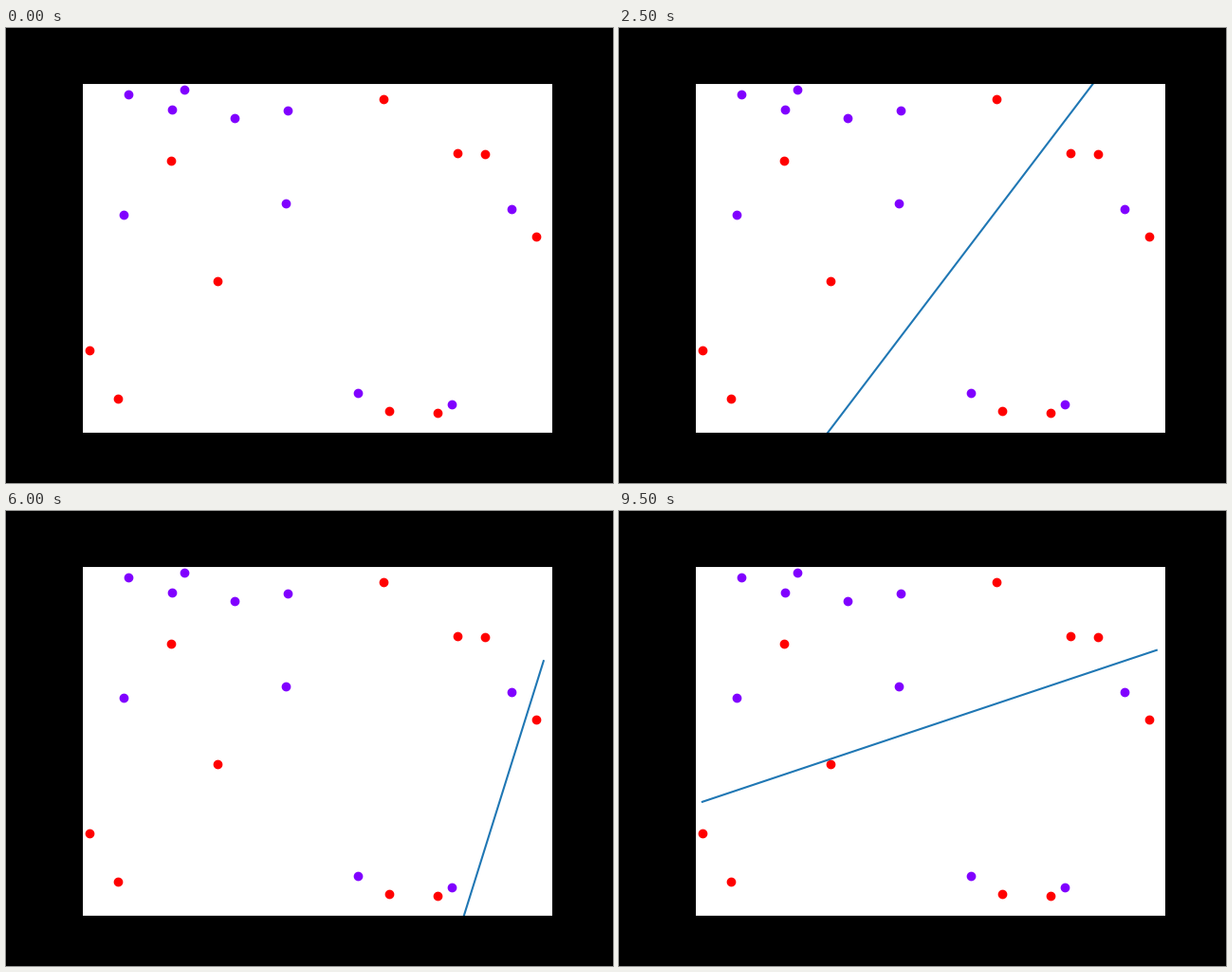
Write a matplotlib script that moves like this. It is 640x480 px and loops after 10000 ms.

```python
import numpy as np
import matplotlib.pyplot as plt
from matplotlib.animation import FuncAnimation

FRAMES, INTERVAL = 20, 500
LEFT, RIGHT = 87.9, 566.8      # horizontal reach of the decision line
TOP, BOTTOM = 59, 427

PURPLE = [(128.7, 69.7), (187.5, 64.9), (174.6, 86), (240.9, 95.3),
          (296.6, 87.2), (294.6, 184.9), (124, 196.5), (532.9, 190.5),
          (371.4, 384.6), (469.8, 396.9)]
RED = [(398.2, 75.4), (475.8, 131.5), (505.2, 132.7), (174, 139.7),
       (559.1, 219.9), (222.9, 266.6), (88.2, 340.4), (117.5, 390.5),
       (403.9, 403.6), (455.2, 406.2)]


def steep(x_top, x_bottom):
    """Line given by where it crosses the top and bottom of the plot."""
    slope = (BOTTOM - TOP) / (x_bottom - x_top)
    return [TOP + slope * (x - x_top) for x in (LEFT, RIGHT)]


def flat(y_left, y_right):
    """Line given by its heights at the left and right ends."""
    return [y_left, y_right]


def through_right(x, y, y_right):
    """Line through (x, y) that ends at the right side at y_right."""
    slope = (y_right - y) / (RIGHT - x)
    return [y_right - slope * (RIGHT - LEFT), y_right]


LINES = [
    None,
    steep(428.6, 350.4),
    steep(563.6, 400),
    flat(345, 105),
    flat(386.6, 60.6),
    steep(499.6, 220),
    steep(135.4, 464.6),
    steep(230.6, 380),
    through_right(290, TOP, 388.5),
    flat(330, 140),
    flat(372.8, 74.9),
    flat(310, 116.5),
    through_right(482.8, BOTTOM, 158.2),
    steep(511.6, 356.4),
    steep(400, 494.6),
    steep(129.4, 442.6),
    steep(259.7, 334.8),
    None,
    flat(250.5, 105.5),
    flat(306.8, 146.8),
]

fig, ax = plt.subplots(figsize=(6.4, 4.8), dpi=100, facecolor="black")
ax.set_position([0.125, 0.11, 0.775, 0.77])
ax.set_xlim(80, 576)
ax.set_ylim(427.2, 57.6)
ax.set_xticks([])
ax.set_yticks([])
for points, color in ((PURPLE, "#8000ff"), (RED, "#ff0000")):
    ax.scatter(*np.transpose(points), c=color)
line, = ax.plot([], [], color="#1f77b4", lw=1.5)


def update(frame):
    heights = LINES[frame % FRAMES]
    if heights is None:
        line.set_data([], [])
    else:
        line.set_data([LEFT, RIGHT], heights)
    return line,


anim = FuncAnimation(fig, update, frames=FRAMES, interval=INTERVAL,
                     repeat=True, repeat_delay=0)
plt.show()
```
